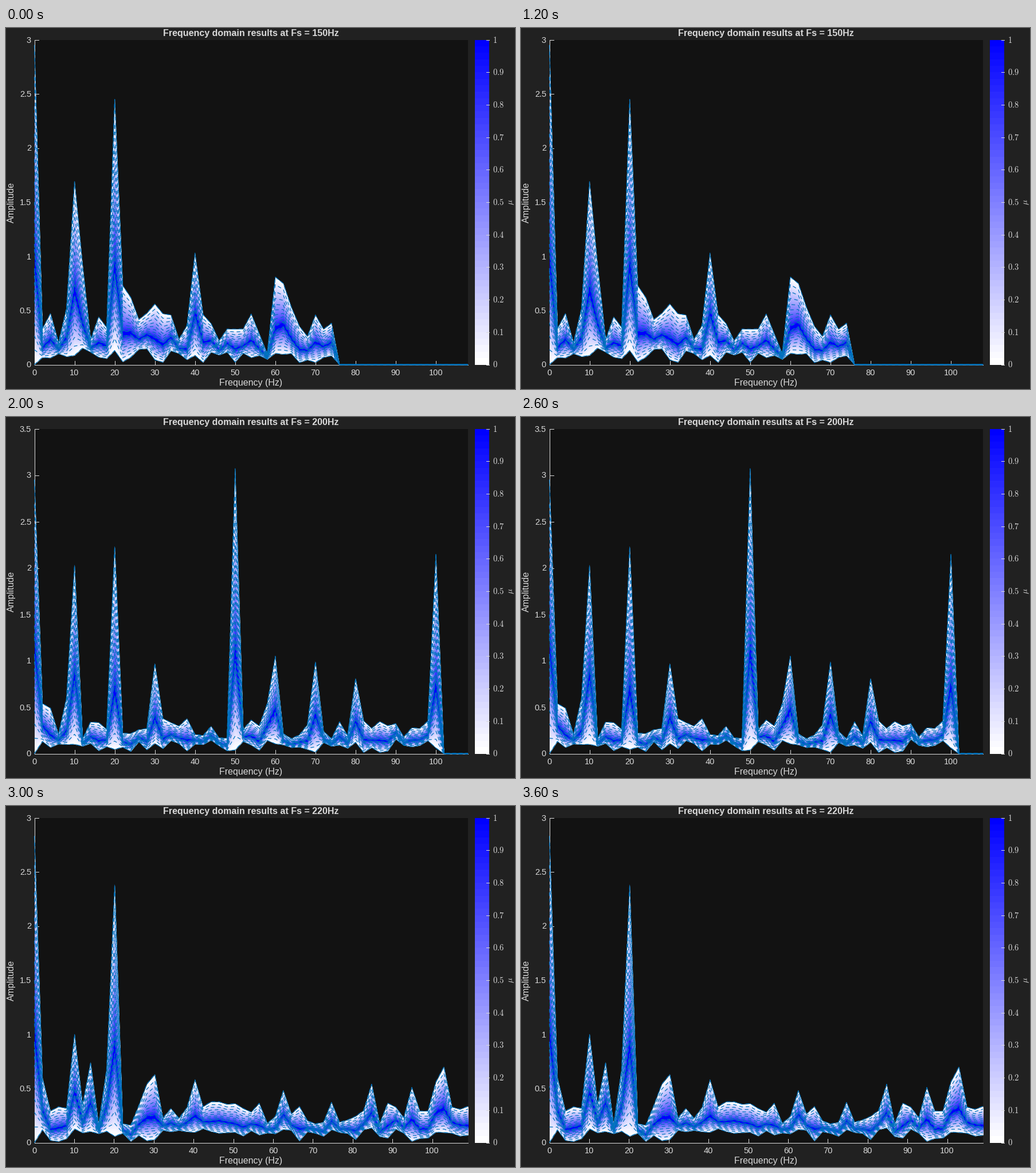
Recreate the animation shown at these times as a matplotlib script. Size 888x630 px, loop 4 s.

```python
import numpy as np
import matplotlib.pyplot as plt
from matplotlib.animation import ArtistAnimation
from matplotlib.patches import Rectangle

W, H, DPI = 888, 630, 100
LEFT, RIGHT, TOP, BOTTOM = 49.5, 806, 20.5, 587.5
BINS = 54
LEVELS = 50
INK, LINE = "#d9d9d9", "#0072bd"

plt.rcParams["font.family"] = "Liberation Sans"
plt.rcParams["mathtext.fontset"] = "cm"

# tones: amplitude at the main frequency bins; every other bin is random floor
SPECTRA = [
    dict(fs=150, span=108, ymax=3, used=38, floor=(.18, .48), seed=4,
         tones={0: 2.95, 4: .52, 5: 1.69, 6: .92, 10: 2.45, 11: .73, 12: .62,
                15: .56, 20: 1.03, 29: .1, 30: .81, 31: .75, 32: .53}),
    dict(fs=200, span=108, ymax=3.5, used=51, floor=(.16, .38), seed=7,
         tones={0: 2.95, 1: .54, 2: .49, 4: .6, 5: 2.03, 10: 2.23, 15: .97,
                25: 3.07, 29: .54, 30: 1.05, 35: .99, 40: .81, 50: 2.15}),
    dict(fs=220, span=108.99, ymax=3, used=55, floor=(.16, .38), seed=9,
         tones={0: 2.83, 1: .6, 5: 1, 7: .74, 9: .68, 10: 2.38, 14: .54,
                15: .63, 20: .58, 31: .48, 42: .54, 47: .51, 50: .56,
                51: .7}),
]

fig = plt.figure(figsize=(W / DPI, H / DPI), dpi=DPI, facecolor="#212121")
ax = fig.add_axes([0, 0, 1, 1])
ax.set(xlim=(0, W), ylim=(H, 0))
ax.axis("off")


def pt(px):
    return px * 72 / DPI


def text(x, y, s, size=14.6, ha="center", **kw):
    return ax.text(x, y, s, fontsize=pt(size), ha=ha, va="baseline",
                   color=INK, **kw)


def stroke(x, y, width=1.0, color=INK, z=2, **kw):
    return ax.plot(x, y, color=color, lw=pt(width), zorder=z, **kw)[0]


def shade(mu):
    return (1 - mu, 1 - mu, 1)


def draw_axes():
    ax.add_patch(Rectangle((LEFT, TOP), RIGHT - LEFT, BOTTOM - TOP,
                           fc="#121212", lw=0, zorder=0))
    stroke([LEFT, LEFT, RIGHT], [TOP, BOTTOM, BOTTOM])
    text(427.5, 624, "Frequency (Hz)", 16)
    text(14, 304, "Amplitude", 16, rotation=90, rotation_mode="anchor")


def draw_colorbar(x0=818, x1=843):
    step = (BOTTOM - TOP) / LEVELS
    for i in range(LEVELS):
        ax.add_patch(Rectangle((x0, BOTTOM - (i + 1) * step), x1 - x0, step,
                               fc=shade(i / (LEVELS - 1)), lw=0,
                               antialiased=False))
    for i in range(11):
        y = BOTTOM - i * (BOTTOM - TOP) / 10
        stroke([x1 - 5, x1], [y, y], z=3)
        text(849, y + 5, f"${i / 10:g}$", ha="left")
    text(884, 304, r"$\mu$", rotation=90, rotation_mode="anchor")


def make_bounds(used, floor, tones, seed):
    """Return lower bound, most likely value and upper bound per bin."""
    rng = np.random.default_rng(seed)
    high = rng.uniform(*floor, BINS + 1)
    high[list(tones)] = list(tones.values())
    high[used:] = 0
    low = np.minimum(rng.uniform(.01, .16, BINS + 1), .5 * high)
    low[0] = 0
    mode = low + rng.uniform(.28, .42, BINS + 1) * (high - low)
    return low, mode, high


def draw_ticks(span, to_y, ymax):
    parts = []
    for v in np.arange(0, ymax + .1, .5):
        y = to_y(v)
        parts += [stroke([LEFT, LEFT + 7.5], [y, y]),
                  text(44, y + 5, f"{v:g}", ha="right")]
    for f in range(0, 101, 10):
        x = LEFT + f * (RIGHT - LEFT) / span
        parts += [stroke([x, x], [BOTTOM - 7, BOTTOM]), text(x, 606, str(f))]
    return parts


def draw_spectrum(fs, span, ymax, **shape):
    """Draw one fuzzy spectrum with its ticks and return the artists."""
    x = np.linspace(LEFT, RIGHT, BINS + 1)
    low, mode, high = make_bounds(**shape)

    def to_y(v):
        return BOTTOM - v * (BOTTOM - TOP) / ymax

    def cut(mu):
        spread = .06 + .94 * (1 - mu) ** 1.6
        return (to_y(mode + spread * (low - mode)),
                to_y(mode + spread * (high - mode)))

    parts = draw_ticks(span, to_y, ymax)
    parts.append(text(427.5, 14, f"Frequency domain results at Fs = {fs}Hz",
                      16, weight="bold"))
    for mu in np.linspace(0, 1, LEVELS):
        parts.append(ax.fill_between(x, *cut(mu), color=shade(mu), lw=0,
                                     zorder=4))
    for mu in np.linspace(0, 1, 11):
        for y in cut(mu):
            parts.append(stroke(x, y, 1.25, LINE, 5, linestyle=(0, (5, 4)),
                                dash_capstyle="butt"))
    for y in cut(0):
        parts.append(stroke(x, y, .7, LINE, 5))
    return parts


draw_axes()
draw_colorbar()
first, second, third = [draw_spectrum(**s) for s in SPECTRA]
anim = ArtistAnimation(fig, [first, first, second, third], interval=1000,
                       repeat=True, repeat_delay=0, blit=False)
plt.show()
```
